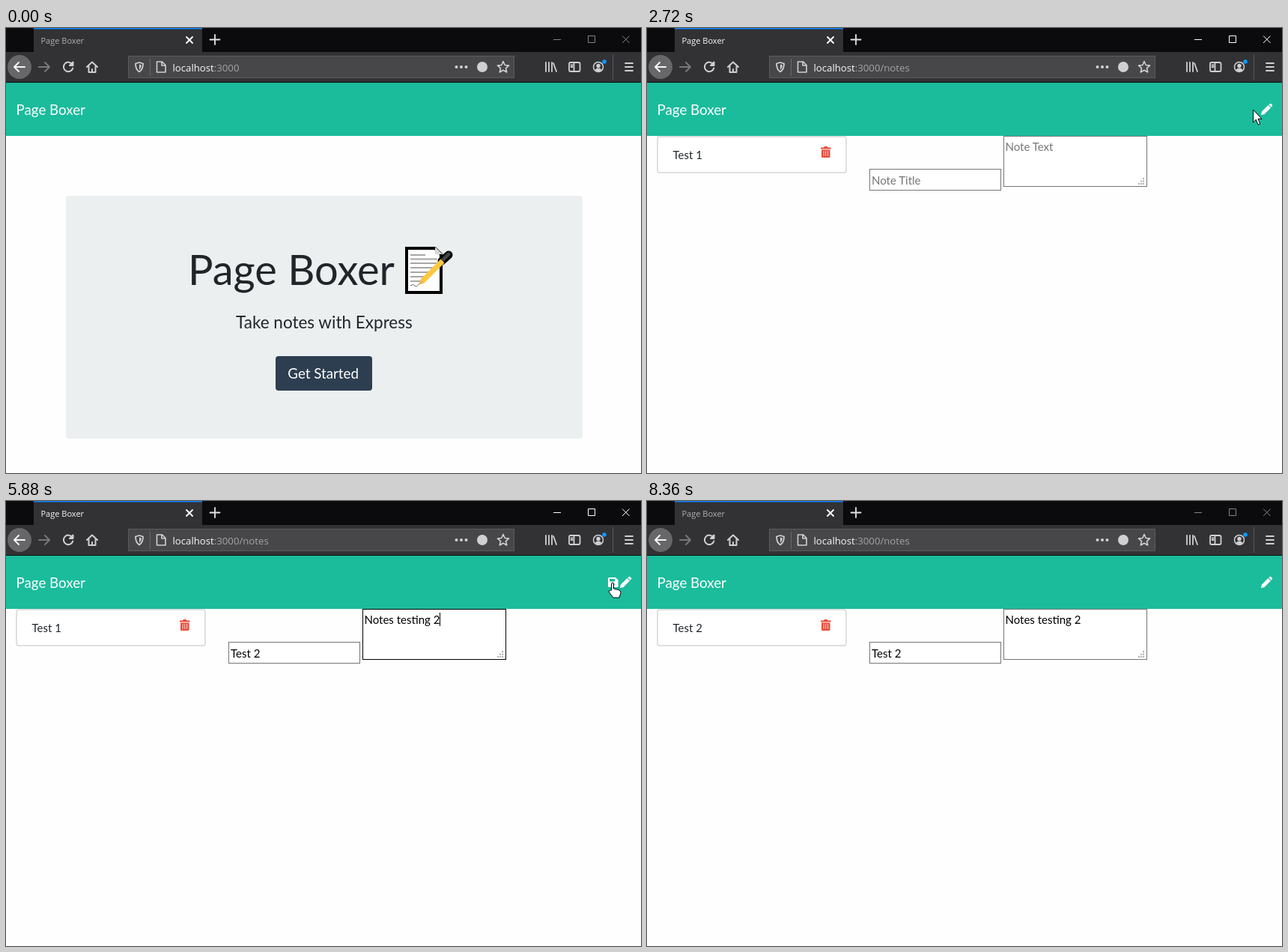
Recreate the animation shown at these times as an HTML page. Size 848 by 594 pixels, loop 8.38 s.

```html
<!DOCTYPE html>
<html lang="en">
<head>
<meta charset="utf-8">
<title>Page Boxer</title>
<style>
  html, body { margin: 0; width: 100%; height: 100%; overflow: hidden; background: #fefefe; }
  svg { display: block; width: 848px; height: 594px; }
  text { white-space: pre; font: 15px Lato, sans-serif; fill: #212529; }
  .ui { font-family: "Open Sans", sans-serif; }
  .line { fill: none; stroke: #d0d0d2; stroke-width: 1.8; stroke-linecap: round; stroke-linejoin: round; }
  .entry { fill: #fff; stroke: #767676; }
</style>
</head>
<body>
<svg viewBox="0 0 848 594">
  <defs>
    <linearGradient id="burstFill">
      <stop offset=".6" stop-color="#0a84ff" stop-opacity=".42"/>
      <stop offset="1" stop-color="#0a84ff" stop-opacity="0"/>
    </linearGradient>
    <clipPath id="tabClip"><path d="M37 2H262V32H37Z"/></clipPath>
    <clipPath id="areaClip"><path d="M478 146H666V209H478Z"/></clipPath>
    <g id="trash" fill="#e74c3c">
      <path d="M232 159.500h4l1-1.500h3.500l1 1.500h4v2h-13.500z"/>
      <path d="M233 162.500h11.500v9q0 1.500-1.500 1.500h-8.500q-1.500 0-1.500-1.500z"/>
      <path d="M236 164v7M238.800 164v7M241.600 164v7" stroke="#fff" stroke-opacity=".75"/>
    </g>
  </defs>

  <rect width="848" height="594" fill="#fefefe"/>

  <!-- Browser frame -->
  <rect width="848" height="32" fill="#0b0b0d"/>
  <rect x="37" width="225" height="32" fill="#323234"/>
  <g clip-path="url(#tabClip)"><rect id="burst" x="37" y="2" height="30" fill="url(#burstFill)"/></g>
  <rect x="37" width="225" height="1.500" fill="#0a84ff"/>
  <text id="tabTitle" class="ui" x="46.500" y="21" style="font-size:11px">Page Boxer</text>
  <path class="line" d="M241 12l8 8m0-8l-8 8" style="stroke:#fff"/>
  <path class="line" d="M272.500 15.500h13M279 9v13" style="stroke:#e4e4e4"/>
  <path id="controls" d="M731 15.500h10M777.500 10.500h9v9h-9zM823 10.500l9.500 9.500m0-9.500l-9.500 9.500" fill="none"/>

  <rect y="32" width="848" height="40" fill="#323234"/>
  <rect y="72" width="848" height="1" fill="#0c0c0d"/>
  <circle cx="18" cy="52" r="16" fill="#676769"/>
  <path class="line" d="M25 52H11m6-6l-6 6l6 6" style="stroke:#f4f4f4;stroke-width:2"/>
  <path class="line" d="M44 52h14m-6-6l6 6l-6 6" style="stroke:#78787a;stroke-width:2"/>
  <path class="line" d="M88.500 48.500A6.300 6.300 0 1 0 89.300 53.500M89.500 45.500v4.500h-4.500z" style="stroke-width:2"/>
  <path class="line" d="M108 52l7-6.500l7 6.500M110.500 51v8h9v-8M115 59v-4" style="stroke-width:2"/>
  <rect x="163.500" y="37.500" width="515" height="29" fill="#474749" stroke="#5b5b5d"/>
  <path class="line" d="M178 46l5 1.500q0 8-5 11q-5-3-5-11z"/>
  <path d="M178 48.500l2.800 1q0 4-2.800 6.500z" fill="#d0d0d2"/>
  <path d="M192.500 41v23" stroke="#68686a"/>
  <path class="line" d="M201.500 45h7l4.500 4.500v9.500h-11.500zM208 45v5h5" style="stroke-width:1.600"/>
  <text class="ui" x="222.500" y="57.700" style="font-size:13.200px;fill:#f9f9fa">localhost<tspan fill="#a3a3a5">:3000<tspan id="path"></tspan></tspan></text>
  <g fill="#d0d0d2"><circle cx="601.500" cy="52" r="2"/><circle cx="608" cy="52" r="2"/><circle cx="614.500" cy="52" r="2"/><circle cx="636" cy="52" r="7"/></g>
  <path class="line" d="M664 44.500l2.200 5l5.300.6l-4 3.600l1.200 5.300l-4.700-2.800l-4.700 2.800l1.200-5.300l-4-3.600l5.300-.6z" style="stroke-width:1.600"/>
  <path class="line" d="M721 46v12M725 46v12M729 46v12M731 47l4 11"/>
  <rect class="line" x="752" y="46" width="14.500" height="12" rx="2"/>
  <path class="line" d="M758.500 46v12M754.500 49.500h2m-2 2.500h2"/>
  <circle class="line" cx="791" cy="52" r="6.500" style="stroke-width:1.500"/>
  <path d="M787 56.500q0-3 4-3t4 3q-4 3-8 0z" fill="#d0d0d2"/>
  <circle cx="791" cy="50.500" r="2.700" fill="#d0d0d2"/>
  <circle cx="799" cy="45" r="2.800" fill="#0a9bff"/>
  <path d="M810.500 35v34" stroke="#59595b"/>
  <path class="line" d="M827 47h10m-10 5h10m-10 5h10"/>

  <!-- Page header -->
  <rect y="73" width="848" height="71" fill="#1abc9c"/>
  <text x="13.500" y="115.500" style="font-size:18.750px;fill:#fff">Page Boxer</text>

  <g id="home">
    <rect x="80" y="224" width="690" height="324" rx="4" fill="#ebeff0"/>
    <text x="243" y="343" style="font-size:56px">Page Boxer</text>
    <path d="M535 294h38l8 8v51h-46z" fill="#fff" stroke="#000" stroke-width="4"/>
    <path d="M573 292v10h10" fill="#d7d7d7"/>
    <path d="M540 303h20M540 308.500h36M540 314h36M540 320h36M540 326h30M540 332h24M540 338h18" stroke="#a6a6a6" stroke-width="1.800"/>
    <path d="M540 344q4-3 6 0t6-3" fill="none" stroke="#666"/>
    <path d="M582 311l9-8" stroke="#000" stroke-width="11" stroke-linecap="round"/>
    <path d="M584 309l7-7" stroke="#444" stroke-width="5" stroke-linecap="round"/>
    <path d="M556 338l27-27" stroke="#fdc83e" stroke-width="7"/>
    <path d="M551 343l2.500-7.500l5 5z" fill="#e8b95c"/>
    <text x="307" y="400.500" style="font-size:22.500px">Take notes with Express</text>
    <rect id="button" x="360" y="438" width="129" height="46" rx="4"/>
    <text x="376.300" y="467.500" style="font-size:18.750px;fill:#fff">Get Started</text>
  </g>

  <g id="notes">
    <g id="save">
      <path d="M805.500 102h8.500l3.500 3.500v8q0 1.500-1.500 1.500h-10.500q-1.500 0-1.500-1.500v-10q0-1.500 1.500-1.500z" fill="#fff"/>
      <path d="M806 104h7v3.500h-7z" fill="#1abc9c"/><circle cx="810.700" cy="111.300" r="2" fill="#1abc9c"/>
    </g>
    <path d="M820 116l.8-4.300l8.700-8.700l3.500 3.500l-8.700 8.700zM830.300 102.200l1.200-1q1-.8 2 0l1.300 1.300q.8 1 0 2l-1 1.200z" fill="#fff"/>
    <rect id="listBox" x="14" y="145" width="252" rx="3" fill="#fff" stroke="#dfdfdf" stroke-width="2"/>
    <text id="name0" x="34.500" y="175"></text>
    <use id="trash0" href="#trash"/>
    <g id="row1">
      <path d="M15 192.500H265" stroke="#dfdfdf"/>
      <text id="name1" x="34.500" y="222"></text>
      <use href="#trash" y="47"/>
    </g>
    <rect id="titleBox" class="entry" x="297.500" y="188.500" width="175" height="28"/>
    <text id="title" x="300" y="209"></text>
    <rect id="textBox" class="entry" x="476.500" y="144.500" width="191" height="67"/>
    <g clip-path="url(#areaClip)"><g id="area">
      <text id="area0" x="478.500" y="164"></text>
      <text id="area1" x="478.500" y="186.500"></text>
      <text id="area2" x="478.500" y="209"></text>
    </g></g>
    <g id="scrollbar">
      <rect x="651" y="145" width="16" height="49" fill="#f0f0f0"/>
      <path d="M655 156l3.500-3.500l3.500 3.500M655 184l3.500 3.500l3.500-3.500" fill="none" stroke="#505050" stroke-width="1.800"/>
    </g>
    <path d="M662 201h2M659 204.500h2m1 0h2M656 208h2m1 0h2m1 0h2" stroke="#b0b0b0" stroke-width="2"/>
    <rect id="caret" width="1" height="18"/>
  </g>

  <g id="pointer" stroke="#000" fill="#fff" stroke-linejoin="round">
    <path id="arrow" d="M.5 0V17L4.300 13.300L7 20L9.800 18.800L7 12.300H12Z"/>
    <path id="beam" d="M-4-9.500h3l1 1l1-1h3M-4 9.500h3l1-1l1 1h3M0-8.500v17" fill="none" stroke-width="2"/>
    <path id="hand" d="M-1.500 9V1q0-2 1.500-2t1.500 2v6l6.500 1.500q3 1 3 4l-2 6.500h-8l-5.500-7q-1-2.500 1-2.500z"/>
  </g>
</svg>

<script>
const LOOP = 8380, BLINK = 140;
const LOREM = ["Lorem ipsum dolor sit", "amet consectetur", "adipisicing elit. Aut totam"];
const LOREM_END = ["quisquam dolores,", "voluptatum nemo eos", "ratione."];
const EMPTY = { title: "", text: [""], focus: "", save: false };

const typing = (start, step, string, patch) =>
  [...string].map((_, i) => [start + i * step, patch(string.slice(0, i + 1))]);

// State changes in order of time
const events = [
  [0, { ...EMPTY, active: false, page: "home", list: [], scrolled: false }],
  [240, { active: true }],
  [300, { page: "notes", save: true }],
  [420, { save: false }],
  [870, { focus: "title" }],
  ...typing(1420, 50, "Test 1", title => ({ title })),
  [1720, { focus: "text" }],
  [1780, { text: LOREM_END, scrolled: true }],
  [1820, { save: true }],
  [2580, { ...EMPTY, scrolled: false }],
  [2640, { list: ["Test 1"] }],
  [3360, { focus: "title" }],
  ...typing(3740, 40, "Test 2", title => ({ title })),
  [4000, { focus: "text" }],
  ...typing(4400, 40, "Notes testing 2", line => ({ text: [line], save: true })),
  [6040, { ...EMPTY, list: ["Test 1", "Test 2"] }],
  [6900, { title: "Test 1", text: LOREM }],
  [7340, { ...EMPTY, list: ["Test 2"] }],
  [7720, { title: "Test 2", text: ["Notes testing 2"] }],
  [8340, { active: false }]
];

// Pointer moves: start, end, x, y, sag of the path
const moves = [
  [60, 220, 447, 475], [480, 860, 368, 205], [2000, 2500, 809, 109],
  [2840, 3300, 420, 212], [3420, 3660, 538, 179], [5140, 5740, 810, 110],
  [6140, 6860, 110, 172, 144], [6880, 6900, 122, 172], [7120, 7280, 237, 165],
  [7540, 7680, 117, 170], [7860, 8300, 300, 560]
];

const $ = id => document.getElementById(id);
const show = (id, on) => $(id).style.display = on ? "" : "none";
const inside = ([x, y], left, top, right, bottom) => x >= left && x <= right && y >= top && y <= bottom;

function write(id, value, placeholder = "") {
  const el = $(id), content = value || placeholder;
  if (el.textContent !== content) el.textContent = content;
  el.style.fill = value ? (placeholder ? "#000" : "") : "#757575";
}

function stateAt(t) {
  const state = {};
  for (const [time, patch] of events) {
    if (time > t) break;
    Object.assign(state, patch);
    state.since = time;
  }
  return state;
}

function pointerAt(t) {
  let x = 470, y = 580;
  for (const [start, end, toX, toY, sag = 0] of moves) {
    if (t < start) break;
    const p = Math.min(1, (t - start) / (end - start));
    const eased = p * p * (3 - 2 * p);
    x += (toX - x) * eased;
    y += (toY - y) * eased + sag * Math.sin(Math.PI * eased);
  }
  return [x, y];
}

function pointerKind(at, s) {
  if (s.page === "home") return inside(at, 360, 438, 489, 484) ? "hand" : "arrow";
  if (inside(at, 297, 188, 473, 217) || inside(at, 476, 144, 668, 212)) return "beam";
  const onTrash = s.list.length && inside(at, 231, 157, 246, 174);
  return onTrash || (s.save && inside(at, 803, 101, 818, 116)) ? "hand" : "arrow";
}

function drawCaret(t, s) {
  show("caret", s.focus && (t - s.since) % (2 * BLINK) < BLINK);
  const inTitle = s.focus === "title", row = s.text.length - 1;
  const el = $(inTitle ? "title" : "area" + row);
  const filled = inTitle ? s.title : s.text[row];
  const x = (inTitle ? 300 : 479) + (filled ? el.getComputedTextLength() : 0);
  $("caret").setAttribute("x", Math.floor(x));
  $("caret").setAttribute("y", inTitle ? 194 : 149 + row * 22.5 - (s.scrolled ? 5 : 0));
}

function draw(t) {
  const s = stateAt(t), onNotes = s.page === "notes";
  const at = pointerAt(t), kind = pointerKind(at, s);

  $("tabTitle").style.fill = s.active ? "#f9f9fa" : "#b0b0b1";
  $("controls").style.stroke = s.active ? "#fff" : "#858586";
  $("path").textContent = onNotes ? "/notes" : "";
  show("burst", t > 320 && t < 500);
  $("burst").setAttribute("width", Math.max(0, 1.25 * (t - 320)));
  $("burst").style.opacity = Math.min(1, (500 - t) / 100);

  show("home", !onNotes);
  show("notes", onNotes);
  $("button").style.fill = kind === "hand" ? "#1e2b37" : "#2c3e50";

  show("save", s.save);
  $("listBox").setAttribute("height", s.list.length > 1 ? 96 : 48);
  write("name0", s.list[0] || "No saved Notes");
  write("name1", s.list[1]);
  show("trash0", s.list.length);
  show("row1", s.list.length > 1);

  write("title", s.title, "Note Title");
  write("area0", s.text[0], "Note Text");
  write("area1", s.text[1], " ");
  write("area2", s.text[2], " ");
  $("area").setAttribute("transform", `translate(0 ${s.scrolled ? -5 : 0})`);
  show("scrollbar", s.text.length > 1);
  for (const field of ["title", "text"])
    $(field + "Box").style.stroke = s.focus === field ? "#000" : "#767676";
  if (onNotes) drawCaret(t, s);

  show("pointer", t >= 60 && t < 8300);
  $("pointer").setAttribute("transform", `translate(${at.map(Math.round)})`);
  for (const shape of ["arrow", "beam", "hand"]) show(shape, shape === kind);
}

const origin = performance.now();
function tick() {
  draw((performance.now() - origin) % LOOP);
  requestAnimationFrame(tick);
}
tick();
</script>
</body>
</html>
```
